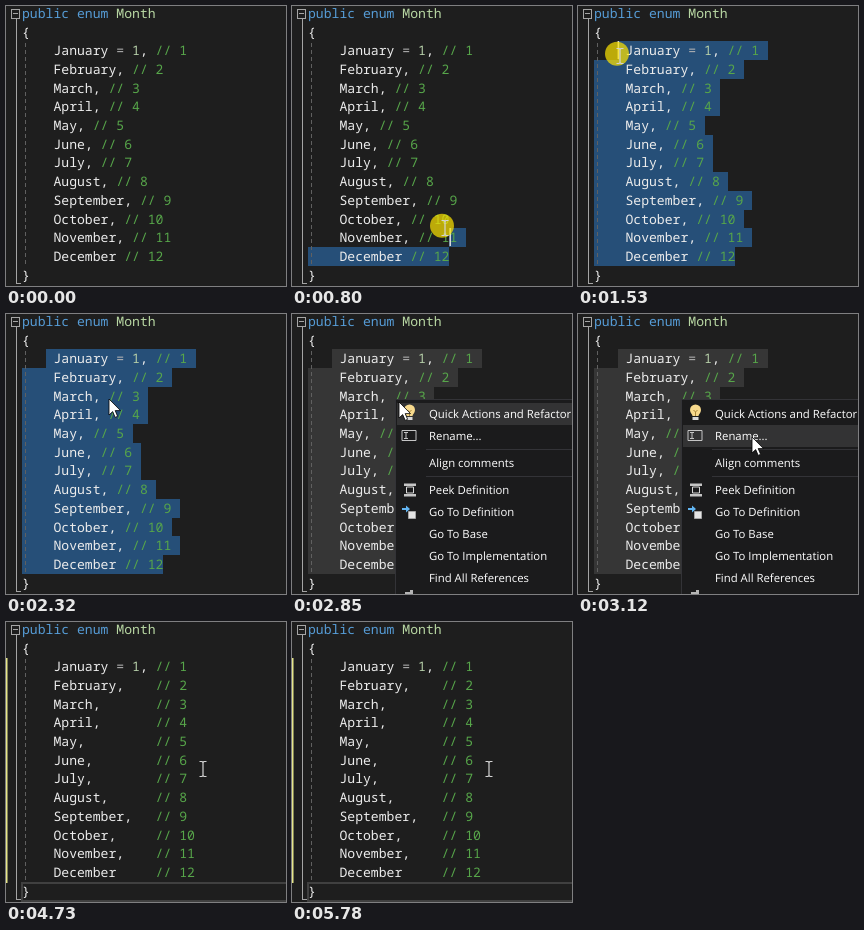
An HTML page for the animation above (5980 ms loop, 280x280 px).

```html
<!DOCTYPE html>
<html lang="en">
<head>
<meta charset="utf-8">
<title>Align comments</title>
<style>
  html, body { margin: 0; width: 100%; height: 100%; overflow: hidden; background: #1e1e1e; }
  svg { display: block; width: 280px; height: 280px; }
  text { white-space: pre; text-rendering: geometricPrecision; }
  .code { font: 500 13.1px "Noto Sans Mono", monospace; fill: #ececec; }
  .code .kw { fill: #569cd6; }
  .code .type { fill: #b8d7a3; }
  .code .num { fill: #b5cea8; }
  .code .note { fill: #57a64a; }
  .code .op { fill: #b4b4b4; }
  .menu { font: 500 11.35px "Open Sans", sans-serif; fill: #fff; }
</style>
</head>
<body>
<svg id="stage" viewBox="0 0 280 280"></svg>
<script>
const LOOP = 5980;
const LEFT = 16, CH = 7.86, ROW = 18.7, TOP = -2, BASE = 11.8;
const FIRST = 2, LAST = 13, NOTE_COL = 17;
const END = { row: LAST, col: 18 };
const MONTHS = ["January", "February", "March", "April", "May", "June", "July",
  "August", "September", "October", "November", "December"];

// Pointer steps: time, x, y
const PATH = [
  [210, 191, 275], [280, 181, 263], [340, 171, 253], [410, 167, 249],
  [660, 167, 249], [730, 158, 236], [800, 153, 222], [860, 139, 198],
  [930, 124, 174], [990, 109, 150], [1060, 95, 126], [1120, 81, 101],
  [1190, 71, 85], [1260, 62, 72], [1320, 53, 62], [1390, 47, 55],
  [1460, 43, 52], [1530, 42, 50],
  [1790, 46, 53], [1850, 62, 62], [1920, 82, 73], [1980, 97, 82], [2050, 103, 85],
  [2850, 107, 88], [2920, 116, 93], [2990, 133, 101], [3060, 155, 112],
  [3120, 174, 123], [3180, 188, 138], [3260, 195, 144], [3530, 196, 146],
  [4130, 197, 147]
];

const ITEMS = [
  ["Quick Actions and Refactorings...", 100], ["Rename...", 122],
  ["Align comments", 149], ["Peek Definition", 176], ["Go To Definition", 198],
  ["Go To Base", 220], ["Go To Implementation", 242], ["Find All References", 264]
];

function add(parent, name, attrs = {}, text) {
  const node = document.createElementNS("http://www.w3.org/2000/svg", name);
  for (const key in attrs) node.setAttribute(key, attrs[key]);
  if (text !== undefined) node.textContent = text;
  return parent.appendChild(node);
}
function set(node, attrs) {
  for (const key in attrs) node.setAttribute(key, attrs[key]);
}
const show = (node, on) => node.style.display = on ? "" : "none";
const moveTo = (node, x, y) => node.setAttribute("transform", `translate(${x} ${y})`);
const colX = col => LEFT + col * CH;
const rowY = row => Math.round(TOP + row * ROW);

const stage = document.getElementById("stage");

// Selection and current line
const bands = MONTHS.map(() => add(stage, "rect", { "shape-rendering": "crispEdges" }));
const lineBox = add(stage, "rect", {
  x: 16, width: 270, height: 18, fill: "none", stroke: "#404040", "stroke-width": 2
});

// Outline margin and indent guide
const margin = add(stage, "g", { fill: "none", stroke: "#a5a5a5", "shape-rendering": "crispEdges" });
add(margin, "path", { d: "M5.5 3.5h8v9h-8zM7 7.5h5M10.5 13V277.5h4" });
add(stage, "path", {
  d: "M19.5 37V261", stroke: "#606060", "stroke-dasharray": "4 3", "shape-rendering": "crispEdges"
});
const changed = add(stage, "rect", { x: 0, y: 36, width: 1.5, height: 225, fill: "#e6e68a" });

// Code
const code = add(stage, "g", { class: "code" });
const put = (row, col, text, kind = "") =>
  add(code, "text", { x: colX(col), y: Math.round(BASE + row * ROW), class: kind }, text);
put(0, 0, "public enum", "kw");
put(0, 12, "Month", "type");
put(1, 0, "{");
put(14, 0, "}");
const lines = MONTHS.map((month, i) => {
  const row = FIRST + i, end = 4 + month.length;
  put(row, 4, month);
  if (!i) {
    put(row, end + 1, "=", "op");
    put(row, end + 3, "1", "num");
  }
  const comma = i < 11 ? 1 : 0;
  const stop = end + (i ? 0 : 4);
  if (comma) put(row, stop, ",");
  const col = stop + comma + 1;
  const label = "// " + (i + 1);
  return { col, length: col + label.length, note: put(row, col, label, "note") };
});
const caret = add(stage, "rect", { width: 1.5, height: 18, fill: "#dcdcdc" });

// Context menu
const menu = add(stage, "g", { class: "menu" });
add(menu, "rect", { x: 103.5, y: 85.5, width: 200, height: 220, fill: "#1b1b1c", stroke: "#333337" });
const hover = add(menu, "rect", { x: 105, width: 180, height: 22, fill: "#333334" });
add(menu, "path", { d: "M134 135.5H280M134 162.5H280", stroke: "#333337" });
for (const [label, y] of ITEMS) add(menu, "text", { x: 137, y: y + 4 }, label);

function icon(x, y, parts) {
  const g = add(menu, "g", { transform: `translate(${x} ${y})` });
  for (const [d, fill, stroke = "none"] of parts) add(g, "path", { d, fill, stroke });
}
icon(117.5, 99, [
  ["M-3 3C-3 1 -5.5 0 -5.5 -3A5.5 5.5 0 0 1 5.5 -3C5.5 0 3 1 3 3Z", "#f7d98c"],
  ["M-2 -3L0 -1L2 -3M0 -1V3", "none", "#a8863a"],
  ["M-3 4H3V7H-3Z", "#d8d8d8"]
]);
icon(117, 121.5, [
  ["M-7 -5H7V5H-7Z", "none", "#c5c5c5"],
  ["M-3 -3V3M-5 -3H-1M-5 3H-1", "none", "#c5c5c5"]
]);
icon(118, 176, [
  ["M-6 -6.5H6V-4H-6ZM-6 4H6V6.5H-6Z", "#c5c5c5"],
  ["M-3.5 -3H3.5V3H-3.5Z", "#1b1b1c", "#d8d8d8"]
]);
icon(117, 198, [
  ["M-7 -4H-3V-6.5L1 -3L-3 .5V-2H-7Z", "#62b5f2"],
  ["M-.5 -.5H6.5V6.5H-.5Z", "#e4e4e4", "#a5a5a5"]
]);
icon(117, 279, [["M-4 1V-1H1V-3H4V1Z", "#b5b5b5"]]);

// Pointer
const press = add(stage, "circle", { r: 12, fill: "#ffe600" });
const beam = add(stage, "path", {
  d: "M-3.5 -7.5H-1L0 -6.5L1 -7.5H3.5M0 -6.5V6.5M-3.5 7.5H-1L0 6.5L1 7.5H3.5",
  fill: "none", stroke: "#d4d4d4", "stroke-width": 1.2
});
const arrow = add(stage, "path", {
  d: "M0 0V16L3.7 12.6L6.2 18.4L8.6 17.3L6.2 11.6H11.5Z",
  fill: "#fff", stroke: "#000", "stroke-width": .8
});

const within = (t, from, to) => t >= from && t < to;

// The editor caret follows one step behind the pointer while dragging.
function caretAt(t, step) {
  if (t >= 4190) return { row: 14, col: 0 };
  if (t < 730) return END;
  if (t >= 1530) return { row: FIRST, col: 3 };
  const [, x, y] = PATH[step - 1];
  const row = Math.min(LAST, Math.floor((y - TOP) / ROW));
  const col = Math.min(lines[row - FIRST].length, Math.round((x - LEFT) / CH));
  return { row, col };
}

function drawSelection(t, pos) {
  const on = within(t, 730, 4190);
  const empty = pos.row === END.row && pos.col === END.col;
  bands.forEach((band, i) => {
    const row = FIRST + i;
    const visible = on && !empty && row >= pos.row;
    show(band, visible);
    if (!visible) return;
    const from = row === pos.row ? colX(pos.col) : LEFT;
    const to = colX(lines[i].length) + (row < LAST ? 8.5 : 0);
    set(band, {
      x: from, y: rowY(row), width: to - from, height: rowY(row + 1) - rowY(row),
      fill: t < 2400 ? "#264f78" : "#363636"
    });
  });
  show(lineBox, t >= 4190 || (within(t, 660, 800) && empty));
  lineBox.setAttribute("y", rowY(pos.row) + 1);
}

function drawPointer(t, step) {
  const visible = step >= 0;
  const isArrow = within(t, 1790, 4130);
  show(arrow, visible && isArrow);
  show(beam, visible && !isArrow);
  const down = within(t, 660, 1790) || within(t, 2190, 2320) || within(t, 4050, 4190);
  show(press, down);
  press.setAttribute("fill-opacity", t < 4130 ? .7 : .5);
  if (!visible) return;
  const [, x, y] = PATH[step];
  moveTo(isArrow ? arrow : beam, x, y);
  const lead = within(t, 730, 1790);
  moveTo(press, x - (lead ? 3 : 0), y - (lead ? 2.3 : 0));
}

function drawMenu(t, step) {
  show(menu, within(t, 2400, 4190));
  show(hover, t >= 2850);
  if (t < 2850) return;
  const y = PATH[step][2];
  hover.setAttribute("y", y < 111 ? 89 : y < 134 ? 111 : 138);
}

function draw(t) {
  let step = -1;
  while (step + 1 < PATH.length && PATH[step + 1][0] <= t) step++;
  const pos = caretAt(t, step);
  drawSelection(t, pos);
  drawPointer(t, step);
  drawMenu(t, step);

  const aligned = t >= 4190;
  show(changed, aligned);
  for (const line of lines) line.note.setAttribute("x", colX(aligned ? NOTE_COL : line.col));

  show(caret, within(t, 660, 2050) || within(t, 4190, 4730) || within(t, 5260, 5780));
  set(caret, { x: colX(pos.col), y: rowY(pos.row) });
}

const start = performance.now();
function tick() {
  draw((performance.now() - start) % LOOP);
  requestAnimationFrame(tick);
}
tick();
</script>
</body>
</html>
```
